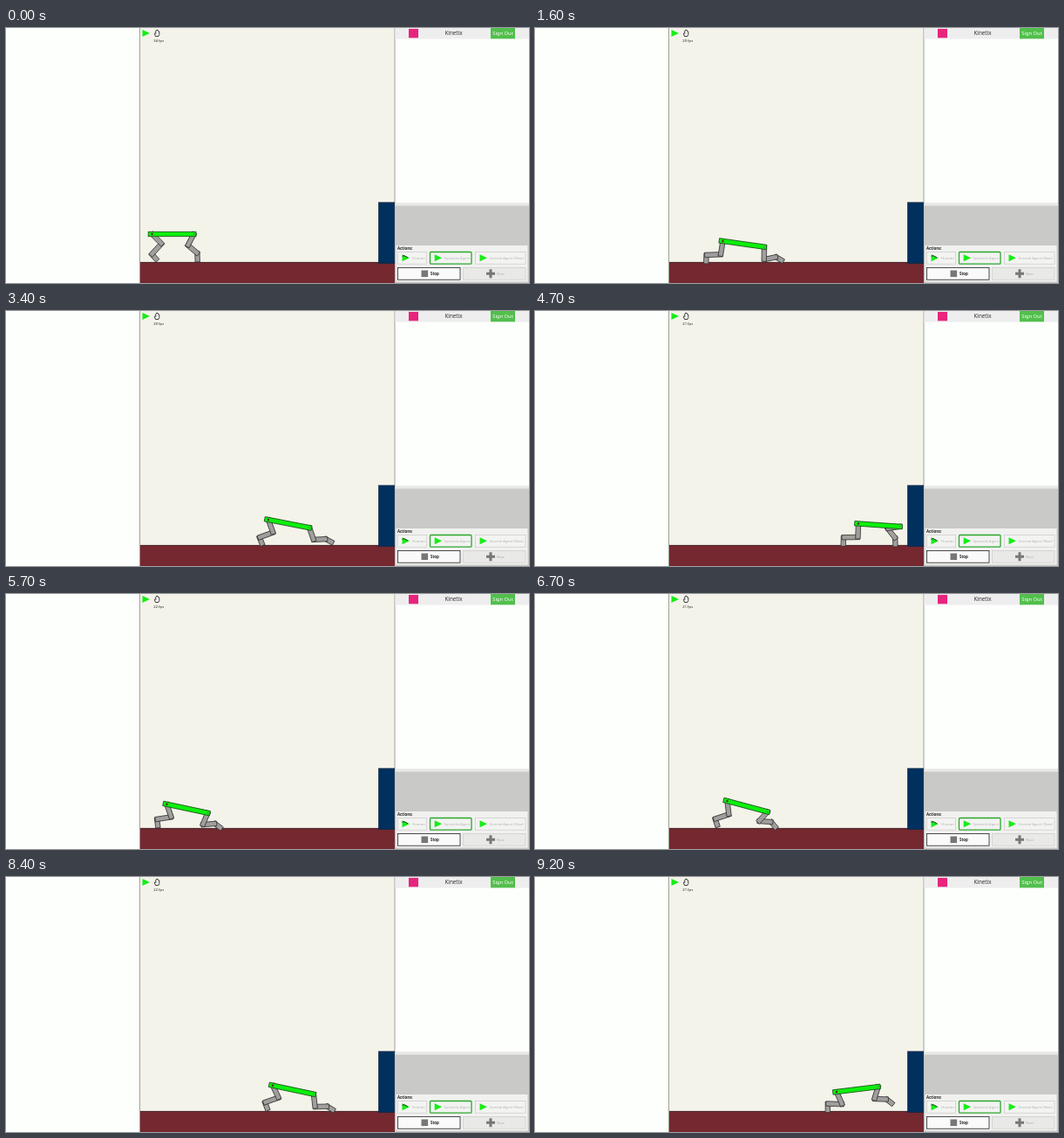
Recreate the animation shown at these times as an HTML page. Size 600 by 292 pixels, loop 9.3 s.

```html
<!DOCTYPE html>
<html lang="en">
<head>
<meta charset="utf-8">
<title>Walker</title>
<style>
  html, body { margin: 0; height: 100%; overflow: hidden; }
  svg { display: block; width: 100vw; height: 100vh; font-family: "Noto Sans", "Open Sans", sans-serif; }
  .limb { fill: #a09f9e; stroke: #333; stroke-width: .8; }
  .small { font-size: 4.3px; fill: #b4b4b4; }
</style>
</head>
<body>
<svg viewBox="0 0 600 292">
  <defs>
    <path id="play" d="M0 0 8.5 4 0 8Z" fill="#17ed17"/>
  </defs>
  <rect width="600" height="292" fill="#fcfffb"/>

  <rect x="153.5" y="-1" width="292.5" height="294" fill="#f4f3ea" stroke="#8d8d88" stroke-width=".8"/>
  <rect x="154" y="268.3" width="292" height="24" fill="#752830"/>
  <path d="M154 268.4H446" stroke="#3b1c20" stroke-width=".9"/>
  <rect x="427.4" y="199.8" width="18.4" height="69.8" fill="#00305e" stroke="#102338" stroke-width=".6"/>
  <use href="#play" x="156.5" y="2"/>
  <path d="M171.4 9.4 170.4 6.4 171.2 5.8 171.8 6.5V3.4L172.7 3V2.4H174V3L175 3.4V4.2H175.8V7.5L174.9 9.5Z" fill="#fff" stroke="#222" stroke-width=".9" stroke-linejoin="round"/>
  <text id="fps" x="175.2" y="16.2" font-size="4.2" text-anchor="middle" fill="#222"></text>

  <g id="walker"></g>

  <rect x="446.5" width="153.5" height="12.5" fill="#eee"/>
  <rect x="462" y="1" width="11" height="10.3" fill="#e8247d"/>
  <text x="513.5" y="8.2" font-size="6.3" text-anchor="middle" fill="#333">Kinetix</text>
  <rect x="556" width="28" height="12.3" fill="#52bf4c"/>
  <text x="570" y="8.2" font-size="5.8" text-anchor="middle" fill="#fff">Sign Out</text>

  <rect x="446.5" y="200" width="153.5" height="4" fill="#e9e9e9"/>
  <rect x="446.5" y="203.5" width="153.5" height="89" fill="#c9c9c8"/>
  <rect x="447.5" y="249" width="151" height="41.5" fill="#f1f1f0"/>
  <text x="449" y="254.2" font-size="4.4" font-weight="bold" fill="#222">Actions:</text>
  <g fill="#f3f3f2" stroke="#cfcfcf" stroke-width=".8">
    <rect x="449.5" y="256.5" width="33" height="13.7"/>
    <rect x="486.5" y="256.5" width="47.5" height="13.7" rx="1" stroke="#2aa82a" stroke-width="1.3"/>
    <rect x="538.5" y="256.5" width="57.5" height="13.7"/>
    <rect x="449.5" y="274.5" width="71.5" height="13.7" fill="#fafafa" stroke="#222"/>
    <rect x="524.5" y="274.5" width="71.5" height="13.7" fill="#e9e9e8"/>
  </g>
  <use href="#play" x="454.5" y="259.3"/>
  <path d="M454.5 261.2 457 260.7 461 263" fill="none" stroke="#333"/>
  <use href="#play" x="491.7" y="259.3"/>
  <use href="#play" x="543.5" y="259.3"/>
  <g class="small">
    <text x="466" y="264.8">Human</text>
    <text x="502.5" y="264.8" font-size="4">Specialist Agent</text>
    <text x="554.5" y="264.8" font-size="4">General Agent (Slow)</text>
    <text x="563" y="282.8">New</text>
  </g>
  <rect x="476.5" y="277.5" width="7.6" height="7.6" fill="#777"/>
  <text x="487" y="282.9" font-size="4.4" font-weight="bold" fill="#222">Stop</text>
  <path d="M551 281.3H561M556 276.3V286.3" stroke="#777" stroke-width="3"/>
</svg>
<script>
const LOOP = 9300, STEP = 100, BODY = 48;
const HIND = [15.5, 16.5, 8], FRONT = [14.5, 14, 8];

// hip height, body angle, then thigh, shin and foot angles of the hind and front legs
const poses = {
  stand:  [236, 0, 45, 133, 48, 118, 40, 88],
  stride: [244, 8, 99, 178, 92, 91, -12, 30],
  reach:  [239, 11, 70, 160, 68, 71, -3, 28],
  tuck:   [243.5, 4, 92, 179, 92, 172, 52, 88],
  lean:   [237, 15, 83, 162, 72, 133, 4, 50],
  leap:   [237.5, 16, 43, 165, 74, 135, 3, 44],
  rear:   [246, -7, 66, 182, 90, 107, 2, 38]
};

// each run: [time, hip x, pose]
const runs = [
  [[0, 167.5, 'stand'], [500, 175, 'stride'], [1000, 193, 'leap'], [1600, 215.5, 'stride'],
   [2000, 237, 'leap'], [2500, 260, 'stride'], [3000, 287, 'lean'], [3400, 301, 'reach'],
   [4000, 335, 'leap'], [4400, 353, 'stride'], [4700, 371, 'tuck'], [4900, 375, 'tuck']],
  [[4900, 167.5, 'stand'], [5400, 176, 'stride'], [6000, 193, 'leap'], [6350, 205, 'lean'],
   [6700, 220.5, 'lean'], [7000, 238, 'rear'], [7600, 268, 'leap'], [8000, 290, 'leap'],
   [8500, 310, 'reach'], [9000, 334, 'rear'], [9200, 346, 'rear']]
];
const rates = [[0, 34], [600, 22], [1300, 20], [3600, 22], [4300, 21], [5400, 22],
               [6300, 21], [7400, 22], [8500, 20], [9100, 21]];

const walker = document.getElementById('walker');
const fps = document.getElementById('fps');
const rad = Math.PI / 180;
const along = (x, y, angle, d) => [x + d * Math.cos(angle * rad), y + d * Math.sin(angle * rad)];

function poseAt(t) {
  const keys = t < runs[1][0][0] ? runs[0] : runs[1];
  const i = Math.max(1, keys.findIndex(k => k[0] >= t));
  const [t0, x0, p0] = keys[i - 1], [t1, x1, p1] = keys[i];
  const u = (t - t0) / (t1 - t0), mix = (a, b) => a + (b - a) * u;
  return [mix(x0, x1), ...poses[p0].map((v, n) => mix(v, poses[p1][n]))];
}

const bar = (x, y, angle, from, length, style) =>
  `<rect x="${from}" y="-2.7" width="${length}" height="5.4" ${style} transform="translate(${x} ${y}) rotate(${angle})"/>`;

function leg(x, y, angles, lengths) {
  let parts = '';
  angles.forEach((angle, i) => {
    parts = bar(x, y, angle, -2, lengths[i] + 4, 'class="limb"') + parts;
    [x, y] = along(x, y, angle, lengths[i]);
  });
  return parts;
}

function draw(t) {
  const [x, y, tilt, ...angles] = poseAt(t);
  const [sx, sy] = along(x, y, tilt, BODY);
  walker.innerHTML =
    leg(x, y, angles.slice(0, 3), HIND) +
    leg(sx, sy, angles.slice(3), FRONT) +
    bar(x, y, tilt, -4.3, BODY + 6.8, 'fill="#0cef0c" stroke="#174d17" stroke-width=".8"') +
    `<circle cx="${x}" cy="${y}" r="1.2" fill="#5a2020"/><circle cx="${sx}" cy="${sy}" r=".9" fill="#6d806d"/>`;
  fps.textContent = rates.filter(r => r[0] <= t).pop()[1] + ' fps';
}

let shown = -1;
const start = performance.now();
function tick() {
  const t = Math.floor((performance.now() - start) % LOOP / STEP) * STEP;
  if (t !== shown) draw(shown = t);
  requestAnimationFrame(tick);
}
tick();
</script>
</body>
</html>
```
